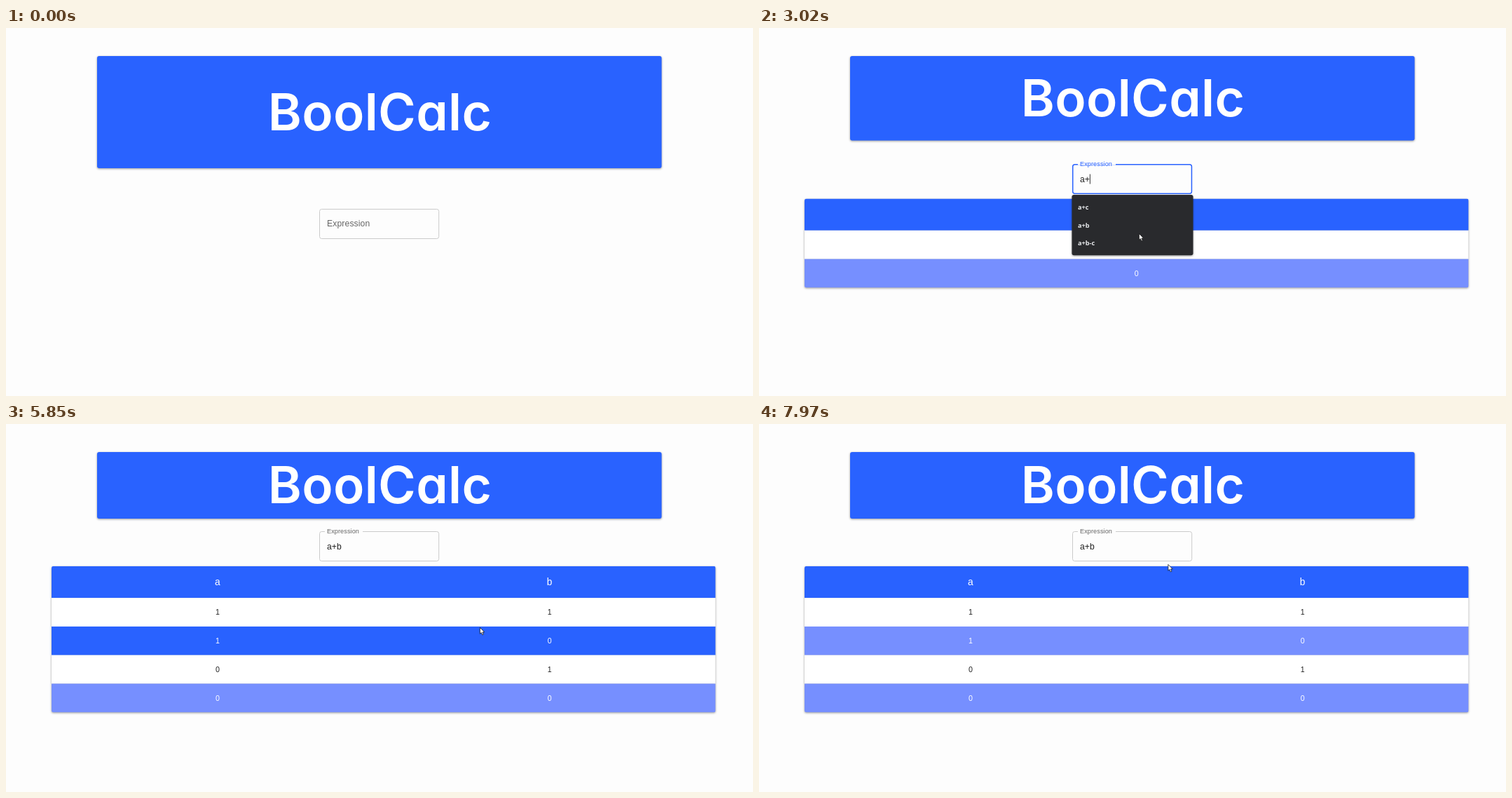
Recreate the animation shown at these times as an HTML page. Size 1066 px wide and 525 px high, loop 8 s.

```html
<!DOCTYPE html>
<html lang="en">
<head>
<meta charset="utf-8">
<title>BoolCalc</title>
<style>
html, body { margin: 0; width: 100%; height: 100%; overflow: hidden; background: #fdfdfd; }
svg { display: block; width: 1066px; height: 525px; font-family: "Liberation Sans", Arial, sans-serif; }
.title { font: 600 73px Inter, sans-serif; font-feature-settings: "cv11"; letter-spacing: .3px; fill: #fff; text-anchor: middle; }
.raised { filter: drop-shadow(0 1.5px 1.5px #0006); }
.table { clip-path: inset(0 round 3px); text-anchor: middle; }
.item { font: 700 9.2px "Open Sans", "Noto Sans", sans-serif; fill: #e8eaed; }
</style>
</head>
<body>
<svg id="stage" viewBox="0 0 1066 525"></svg>
<script>
const LOOP = 8000, BLUE = '#2962ff', LIGHT = '#768fff', PAGE = '#fdfdfd';
const LEFT = 65, WIDTH = 947.6, ROW = 40.8, HEAD = 45.3, ITEM = 25.2, PAD = 5.3;
const HISTORY = ['a', 'ab', 'a+c', 'a+b', 'a+b-c', 'ab+c+am-3c'];

// Each scene inherits whatever it does not override.
const scenes = [
  { t: 0, banner: 160, field: 258, text: '', focus: false, preview: null, popY: 0, items: [], table: 0, vars: [] },
  { t: 1490, focus: true },
  { t: 1560, popY: 302, items: HISTORY },
  { t: 2040, text: 'a' },
  { t: 2120, banner: 146, field: 235, popY: 279, table: 284.5 },
  { t: 2190, banner: 120.5, field: 194, table: 243.5, vars: ['a'], preview: 'a' },
  { t: 3020, text: 'a+', preview: null, popY: 238, items: ['a+c', 'a+b', 'a+b-c'], still: true },
  { t: 3680, text: 'a+b', items: ['a+b', 'a+b-c'] },
  { t: 3740, banner: 95, field: 153, table: 202.8, vars: ['a', 'b'] },
  { t: 4190, preview: 'a+b-c', still: false },
  { t: 4260, preview: 'a+b' },
  { t: 4410, preview: null },
  { t: 5000, items: [] },
  { t: 5080, focus: false },
];

// Pointer moves: start, end, number of steps, destination.
const moves = [
  [210, 520, 5, 616, 383], [600, 600, 1, 614, 394],
  [850, 1240, 6, 542, 293],
  [4190, 4190, 1, 550, 267], [4260, 4710, 7, 680, 200],
  [4920, 5160, 4, 682, 159],
  [5310, 5850, 8, 676, 290],
  [6210, 6680, 7, 673, 374], [6750, 6880, 3, 672, 385],
  [7220, 7660, 7, 600, 225],
  [7970, 7970, 1, 583.5, 200],
];

const rect = (x, y, w, h, fill, more = '') =>
  `<rect x="${x}" y="${y}" width="${w}" height="${h}" fill="${fill}" ${more}/>`;
const text = (x, y, s, size, fill, more = '') =>
  `<text x="${x}" y="${y}" font-size="${size}" fill="${fill}" ${more}>${s}</text>`;

function sceneAt(t) {
  return Object.assign({}, ...scenes.filter(s => s.t <= t));
}

function pointerAt(t) {
  let x = 1019, y = 540;
  for (const [start, end, steps, toX, toY] of moves) {
    if (t < start) break;
    const gap = (end - start) / (steps - 1) || 1;
    const p = Math.min(steps, Math.floor((t - start) / gap + 1.001)) / steps;
    x += (toX - x) * p;
    y += (toY - y) * p;
  }
  return { x, y };
}

function banner({ banner: h }) {
  return `<g class="raised">${rect(130, 40, 805.6, h, BLUE, 'rx="3"')}</g>` +
    `<text class="title" x="533.5" y="${65.5 + h / 2}">BoolCalc</text>`;
}

function table({ table: top, vars, items }, pointer) {
  if (!top) return '';
  const n = vars.length, rows = n ? 2 ** n : 0;
  const colX = i => LEFT + WIDTH * (i + .5) / n;
  let out = rect(LEFT, top, WIDTH, HEAD, BLUE);
  vars.forEach((v, i) => out += text(colX(i), top + 27.3, v, 13.75, '#fff'));
  for (let r = 0; r < rows; r++) {
    const y = top + HEAD + r * ROW, odd = r % 2;
    const hover = !items.length && pointer.y >= y && pointer.y < y + ROW;
    const fill = odd ? (hover ? BLUE : LIGHT) : (hover ? '#f5f5f5' : '#fff');
    out += rect(LEFT, y, WIDTH, ROW + .1, fill);
    for (let i = 0; i < n; i++)
      out += text(colX(i), y + 24.2, 1 - (r >> (n - 1 - i) & 1), 10.7, odd ? '#fff' : '#212121');
  }
  return `<g class="raised"><g class="table">${out}</g></g>`;
}

function field({ field: top, text: value, focus, preview }, t, pointer) {
  const p = Math.max(0, Math.min(1, (t - 1490) / 200));
  const ease = 1 - (1 - p) ** 3;
  const hover = inField(top, pointer);
  const stroke = focus ? BLUE : hover ? '#2b2b2b' : '#cbcbcb';
  const line = focus ? 1.5 : 1;
  let out = rect(447 + line / 2, top + line / 2, 171.2 - line, 43 - line, preview ? '#e8f0fe' : 'none',
    `rx="3" stroke="${stroke}" stroke-width="${line}"`);
  if (p > 0) out += rect(455, top - 1, 54 * ease, 2.6, PAGE);
  out += text(458, top + 25.3 - 22 * ease, 'Expression', 12.2 - 3.05 * ease,
    focus ? BLUE : '#666', 'letter-spacing=".009em"');
  out += text(458, top + 25.5, preview || value, preview ? 10.2 : 12.2, '#212121');
  if (focus && !preview) {
    const width = [...value].reduce((w, c) => w + (c === '+' ? .584 : .556) * 12.2, 0);
    out += rect(458 + width, top + 14.5, .9, 14, '#222');
  }
  return out;
}

function popup({ popY, items, still }, pointer) {
  if (!items.length) return '';
  let out = rect(446.5, popY, 173, items.length * ITEM + 2 * PAD, '#292a2d', 'rx="3" class="raised"');
  items.forEach((s, i) => {
    const y = popY + PAD + i * ITEM;
    const over = !still && pointer.x < 619 && pointer.y >= y && pointer.y < y + ITEM;
    if (over) out += rect(446.5, y, 173, ITEM, '#3f4042');
    out += `<text class="item" x="455" y="${y + 16}">${s}</text>`;
  });
  return out;
}

function inField(top, { x, y }) {
  return x > 447 && x < 618 && y > top && y < top + 43;
}

function cursor(scene, { x, y }) {
  const beam = inField(scene.field, { x, y });
  const shape = beam
    ? '<path d="M-2.5-6H-.6L0-5.4.6-6H2.5M0-5.4V5.4M-2.5 6H-.6L0 5.4.6 6H2.5" fill="none" stroke="#222"/>'
    : '<path d="M.4.4V9.3L2.4 7.5 3.8 10.9 5.4 10.2 4 6.9H6.8Z" fill="#fff" stroke="#111" stroke-width=".75"/>';
  return `<g transform="translate(${x} ${y})">${shape}</g>`;
}

const stage = document.getElementById('stage');
const begin = performance.now();

function frame() {
  const t = (performance.now() - begin) % LOOP;
  const scene = sceneAt(t), pointer = pointerAt(t);
  stage.innerHTML = banner(scene) + table(scene, pointer) + field(scene, t, pointer) +
    popup(scene, pointer) + cursor(scene, pointer);
  requestAnimationFrame(frame);
}
frame();
</script>
</body>
</html>
```
